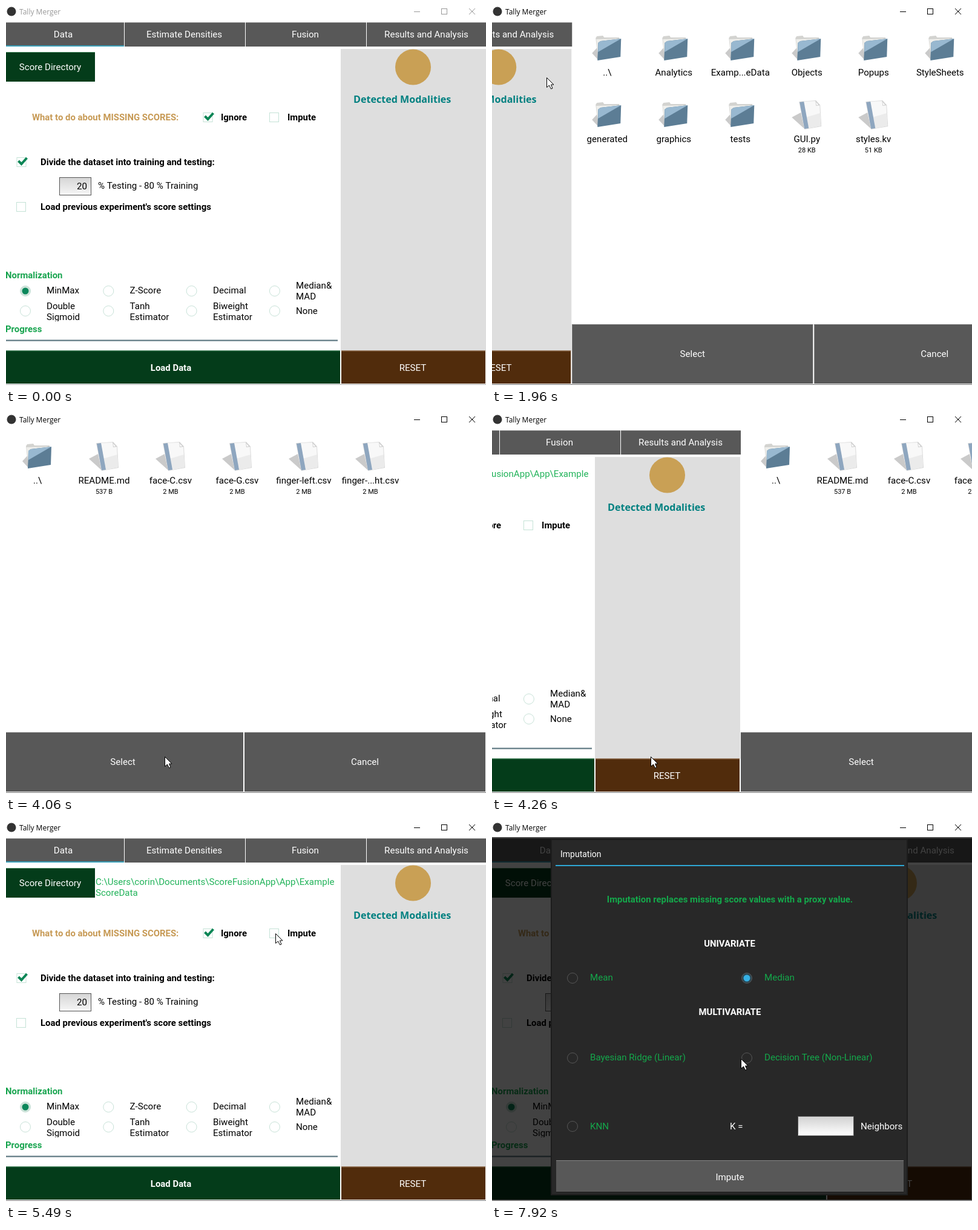
An HTML page with a canvas for the animation above (8 s loop, 793 by 628 pixels).

```html
<!DOCTYPE html>
<html lang="en">
<head>
<meta charset="utf-8">
<title>Tally Merger</title>
<style>
  html, body { margin: 0; width: 100%; height: 100%; overflow: hidden; background: #fff; }
  canvas { display: block; }
</style>
</head>
<body>
<canvas id="stage" width="793" height="628"></canvas>
<script>
const g = document.getElementById('stage').getContext('2d');
const LOOP = 8000, WIDTH = 793, HEIGHT = 628, SCREEN = 800;
const REGULAR = '15.1px Roboto, sans-serif';
const BOLD = 'bold 14.9px Roboto, sans-serif';
const SMALL = '11px Roboto, sans-serif';
const GREEN = '#19a550', POPUP_GREEN = '#14a84b', DARK_GREEN = '#043c1a', GREY = '#585858';

// The pointer: start time, end time, control point, end point
const START = [393, 392];
const MOVES = [
  [460, 950, 230, 250, 90, 118],
  [2020, 2430, 180, 100, 262, 88],
  [2430, 2500, 264, 80, 266, 73],
  [3242, 3930, 211, 330, 262, 566],
  [4600, 4880, 310, 470, 351, 379],
  [4880, 5490, 510, 250, 445, 184],
  [6420, 7110, 470, 205, 425, 261],
  [7242, 7920, 365, 330, 411, 391],
];
const CLICKS = [[1130, 1270], [2560, 2630], [2700, 2765], [3985, 4055], [5885, 6090], [7180, 7310]];

const ROOT_DIR = [
  ['..\\'], ['Analytics'], ['Examp...eData'], ['Objects'], ['Popups'], ['StyleSheets'],
  ['generated'], ['graphics'], ['tests'], ['GUI.py', '28 KB'], ['styles.kv', '51 KB'],
];
const DATA_DIR = [
  ['..\\'], ['README.md', '537 B'], ['face-C.csv', '2 MB'], ['face-G.csv', '2 MB'],
  ['finger-left.csv', '2 MB'], ['finger-...ht.csv', '2 MB'],
];

const clamp = v => Math.max(0, Math.min(1, v));
const smooth = v => v * v * (3 - 2 * v);

function rect(x, y, w, h, fill) {
  g.fillStyle = fill;
  g.fillRect(x, y, w, h);
}

function poly(fill, ...points) {
  g.fillStyle = fill;
  g.beginPath();
  for (let i = 0; i < points.length; i += 2) g.lineTo(points[i], points[i + 1]);
  g.closePath();
  g.fill();
}

function disc(x, y, r, fill, stroke) {
  g.beginPath();
  g.arc(x, y, r, 0, Math.PI * 2);
  if (fill) { g.fillStyle = fill; g.fill(); }
  if (stroke) { g.strokeStyle = stroke; g.lineWidth = 1; g.stroke(); }
}

function text(value, x, middle, color = '#000', font = REGULAR, align = 'left') {
  g.font = font;
  g.fillStyle = color;
  g.textAlign = align;
  g.fillText(value, x, middle + (font === SMALL ? 4 : 5));
}

function button(label, labelX, labelY, x, y, w, h, fill, edge, font = REGULAR) {
  rect(x, y, w, h, fill);
  rect(x, y, w, 1, edge);
  text(label, labelX, labelY, '#fff', font, 'center');
}

function field(x, y, w, h, top, bottom) {
  const shade = g.createLinearGradient(0, y, 0, y + h);
  shade.addColorStop(0, top);
  shade.addColorStop(1, bottom);
  rect(x, y, w, h, shade);
}

function checkbox(x, y, checked) {
  g.strokeStyle = '#c4e2d6';
  g.lineWidth = 1;
  g.strokeRect(x - 7.5, y - 7.5, 15, 15);
  if (!checked) return;
  g.strokeStyle = '#0c8656';
  g.lineWidth = 4;
  g.beginPath();
  g.moveTo(x - 5, y - 2);
  g.lineTo(x, y + 3);
  g.lineTo(x + 9, y - 7);
  g.stroke();
}

function radio(x, y, selected, ring, halo, dot) {
  disc(x, y, 8.5, selected ? halo : null, ring);
  if (selected) disc(x, y, 5.5, dot);
}

function folder(x, y) {
  g.save();
  g.translate(x, y);
  poly('#cacaca', -25, 8, -14, -4, -14, 20);
  poly('#d3d3d0', -19, -17, -17, -20, -7, -21, -5, -18, 20, -18, 21, 12, -15, 19);
  poly('#efefec', -18, -15, 19, -16, 19, 2, -15, 16);
  poly('#5c7d95', -15, -9, -11, -12, 23, -16, 22, 14, -16, 20);
  poly('#98b8d0', -15, -9, -11, -12, 23, -16, 4, -5, -15, 6);
  g.restore();
}

function page(x, y) {
  g.save();
  g.translate(x, y);
  poly('#cacaca', -25, 4, -10, -4, -4, 23);
  poly('#d9d9d9', -13, -22, 15, -24, 22, -16, 24, 19, -4, 24);
  poly('#f8f8f8', -6, -22, 14, -23, 21, -16, 23, 18, 3, 22);
  poly('#ebebeb', -2, 4, 22, -3, 23, 18, 3, 22);
  poly('#8ea6bf', -12, -21, -5, -22, 3, 22, -4, 23);
  poly('#cfcfcf', 14, -24, 22, -16, 15, -15);
  poly('#fff', 15, -21, 19, -17, 16, -16);
  g.restore();
}

function fileScreen(entries) {
  rect(-6, 25, SCREEN, 600, '#fff');
  entries.forEach(([name, size], i) => {
    const x = 52 + 110 * (i % 6), y = 70 + 110 * Math.floor(i / 6);
    (size ? page : folder)(x, y);
    text(name, x, y + 40, '#000', REGULAR, 'center');
    if (size) text(size, x, y + 58, '#000', SMALL, 'center');
  });
  button('Select', 193, 575, -6, 526, 398, 98, GREY, '#6c6c6c');
  button('Cancel', 593, 575, 394, 526, 398, 98, GREY, '#6c6c6c');
}

function mainScreen(directoryChosen, imputing) {
  rect(-6, 25, SCREEN, 600, '#fff');
  ['Data', 'Estimate Densities', 'Fusion', 'Results and Analysis'].forEach((label, i) =>
    button(label, 94.5 + 200 * i, 47, -4 + 200 * i, 27, 199, 40, GREY, '#808080'));
  rect(-4, 65, 199, 2, '#3a9fb8');

  button('Score Directory', 73, 101, -6, 76, 153, 49, DARK_GREEN, '#4a8a62');
  if (directoryChosen) {
    text('C:\\Users\\corin\\Documents\\ScoreFusionApp\\App\\Example', 148, 99, '#22b35a');
    text('ScoreData', 148, 117, '#22b35a');
  }

  text('What to do about MISSING SCORES:', 43, 184, '#c79a55', BOLD);
  checkbox(333.5, 184, !imputing);
  text('Ignore', 355, 184, '#000', BOLD);
  checkbox(443, 184, imputing);
  text('Impute', 465, 184, '#000', BOLD);
  checkbox(25.5, 258, true);
  text('Divide the dataset into training and testing:', 57, 258, '#000', BOLD);
  rect(88, 283, 53, 30, '#555');
  field(89, 284, 51, 28, '#d6d6d6', '#f6f6f6');
  text('20', 134, 298, '#000', REGULAR, 'right');
  text('% Testing - 80 % Training', 152, 297);
  checkbox(25, 332, false);
  text("Load previous experiment's score settings", 57, 332, '#000', BOLD);

  text('Normalization', -1, 445, GREEN, BOLD);
  const methods = [
    ['MinMax', 'Double', 'Sigmoid'], ['Z-Score', 'Tanh', 'Estimator'], ['Decimal', 'Biweight', 'Estimator'],
  ];
  methods.forEach(([single, first, second], i) => {
    const x = 67 + 137.5 * i;
    text(single, x, 470);
    text(first, x, 496);
    text(second, x, 514);
  });
  text('Median&', 479, 462);
  text('MAD', 479, 480);
  text('None', 479, 504);
  rect(60, 521, 490, 8, '#fff');
  for (let i = 0; i < 4; i++) {
    radio(32 + 137.3 * i, 471, i === 0, '#c8e2d8', '#cfe3da', '#0c875b');
    radio(32 + 137.3 * i, 504, false, '#c8e2d8');
  }
  text('Progress', -1, 534, GREEN, BOLD);
  rect(-6, 551.5, 554, 2.5, '#708790');

  rect(553, 71, 240, 499, '#dedede');
  disc(672.5, 101, 29.5, '#c9a055');
  text('Detected Modalities', 574, 155, '#008080', 'bold 16.1px "Open Sans", sans-serif');
  button('Load Data', 272.5, 598, -6, 569.5, 558, 54.5, DARK_GREEN, '#2c7a4a', BOLD);
  button('RESET', 672, 598, 554, 569.5, 238, 54.5, '#512c0c', '#a07a58');
}

function popup(medianSelected) {
  rect(97, 27, 590, 590, '#1d1d1d');
  rect(99, 30, 586, 585, '#282828');
  text('Imputation', 113, 53, '#fff', '14px Roboto, sans-serif');
  rect(105, 71, 576, 2, '#2fa7d4');
  text('Imputation replaces missing score values with a proxy value.', 393, 128, POPUP_GREEN, BOLD, 'center');
  text('UNIVARIATE', 392.5, 201, '#fff', BOLD, 'center');
  text('MULTIVARIATE', 393, 314, '#fff', BOLD, 'center');
  const choices = [
    ['Mean', 133, 257, !medianSelected], ['Median', 421, 257, medianSelected],
    ['Bayesian Ridge (Linear)', 133, 389], ['Decision Tree (Non-Linear)', 421, 389], ['KNN', 133, 503],
  ];
  for (const [label, x, y, selected] of choices) {
    radio(x, y === 503 ? y : y + 1, selected, '#565656', '#2b4855', '#35b0e4');
    text(label, x + 29, y, POPUP_GREEN);
  }
  text('K =', 393, 503, '#fff');
  rect(505, 486, 93, 33, '#555');
  field(506, 487, 91, 31, '#d2d2d2', '#fff');
  text('Neighbors', 609, 503, '#fff');
  button('Impute', 393, 587, 106, 559, 574, 52, GREY, '#858585');
  rect(106, 611, 574, 1, '#1d1d1d');
}

function titleBar(active) {
  const ink = active ? '#000' : '#999';
  rect(0, 0, WIDTH, 25, '#fff');
  disc(9, 9, 7.5, '#333');
  text('Tally Merger', 22, 9, ink, '12px "Open Sans", sans-serif');
  rect(674, 9, 10, 1, ink);
  g.strokeStyle = ink;
  g.lineWidth = 1;
  g.strokeRect(719.5, 4.5, 9, 9);
  g.beginPath();
  g.moveTo(765, 4); g.lineTo(775, 14);
  g.moveTo(775, 4); g.lineTo(765, 14);
  g.stroke();
  rect(0, 625, WIDTH, 1, active ? '#6c6c6c' : '#a8a8a8');
}

function pointerAt(t) {
  let [x, y] = START;
  for (const [from, to, cx, cy, endX, endY] of MOVES) {
    if (t < from) break;
    const u = smooth(clamp((t - from) / (to - from))), v = 1 - u;
    x = v * v * x + 2 * u * v * cx + u * u * endX;
    y = v * v * y + 2 * u * v * cy + u * u * endY;
  }
  return [Math.round(x), Math.round(y)];
}

function pointer(t) {
  const [x, y] = pointerAt(t);
  if (CLICKS.some(([on, off]) => t >= on && t < off)) disc(x, y, 12, 'rgba(240,228,20,.55)');
  g.save();
  g.translate(x + 0.5, y + 0.5);
  poly('#fff', 0, 0, 0, 16, 4, 12.5, 7, 18.5, 9.5, 17.5, 7, 11.5, 11.5, 11.5);
  g.strokeStyle = '#000';
  g.lineWidth = 1;
  g.stroke();
  g.restore();
}

function slide(t, start) {
  const rest = 1 - clamp((t - start) / 407);
  return 1 - rest * rest;
}

function shifted(dx, draw) {
  if (Math.abs(dx) >= SCREEN) return;
  g.save();
  g.translate(dx, 0);
  draw();
  g.restore();
}

function draw(t) {
  rect(0, 0, WIDTH, HEIGHT, '#fff');
  const shift = SCREEN * (slide(t, 1716) - slide(t, 4137));
  shifted(-shift, () => mainScreen(t > 4050, t > 5885));
  shifted(SCREEN - shift, () => fileScreen(t < 3035 ? ROOT_DIR : DATA_DIR));

  const opening = clamp((t - 5892) / 175);
  if (opening > 0) {
    rect(0, 25, WIDTH, 600, `rgba(0,0,0,${0.74 * opening})`);
    g.globalAlpha = Math.min(1, opening * 1.3);
    popup(t >= 7180);
    g.globalAlpha = 1;
  }
  titleBar(t >= 1130);
  if (t >= 460) pointer(t);
}

const stepped = t => 460 + 67.9 * Math.floor((t - 446) / 67.9);

const begin = performance.now();
function tick() {
  draw(stepped((performance.now() - begin) % LOOP));
  requestAnimationFrame(tick);
}
tick();
</script>
</body>
</html>
```
